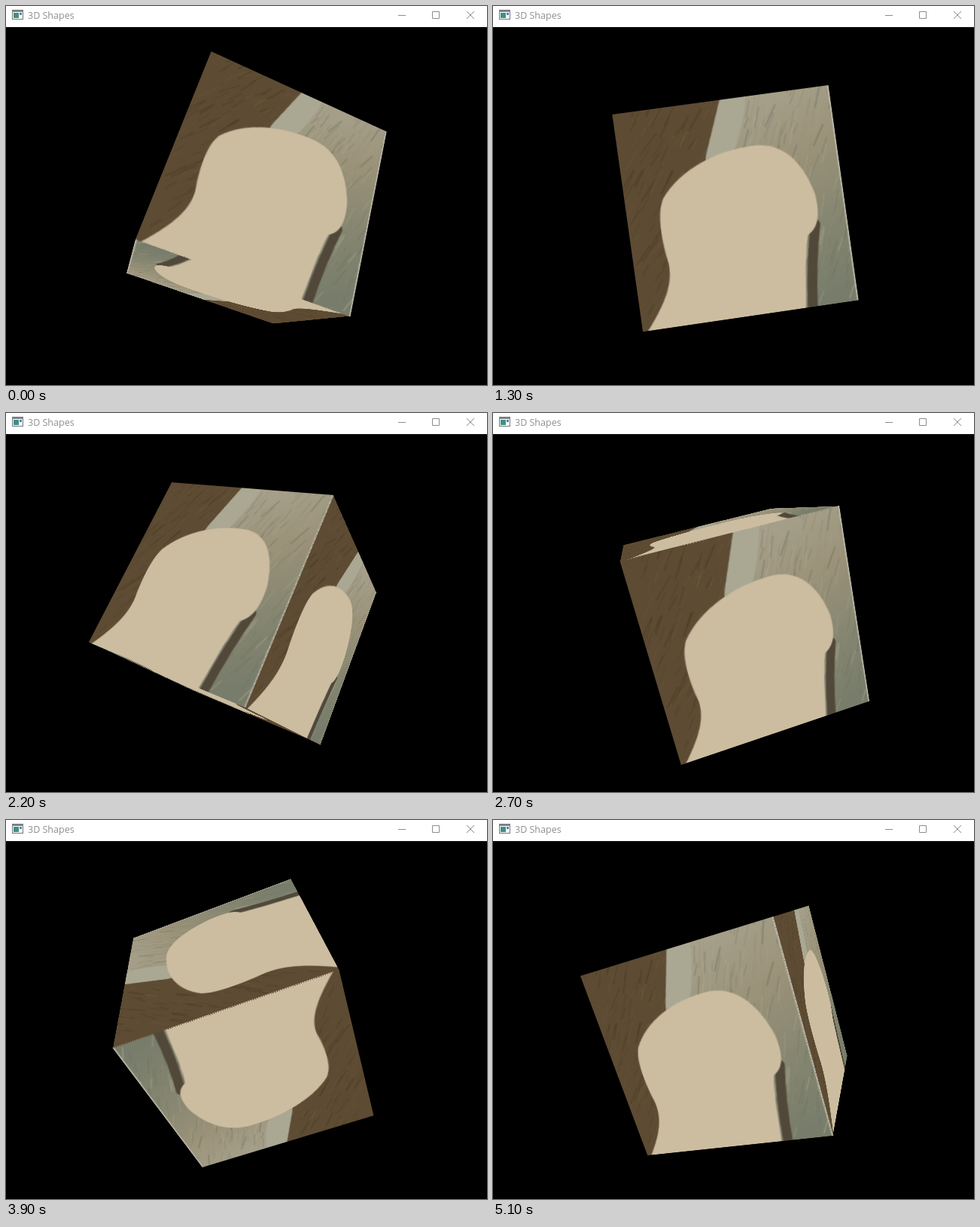
An HTML page with a canvas that plays this animation: 639x503 px, repeating every 5200 ms.

```html
<!DOCTYPE html>
<html lang="en">
<head>
<meta charset="utf-8">
<title>3D Shapes</title>
<style>
@property --a { syntax: '<angle>'; inherits: false; initial-value: 163.1deg; }
html, body { margin: 0; width: 100%; height: 100%; overflow: hidden; background: #000; }
.bar { position: absolute; left: 0; top: 0; width: 639px; height: 28px; background: #fff; }
.bar svg { display: block; }
.bar text { font: 12.5px "Open Sans", "Noto Sans", sans-serif; fill: #8f8f8f; }
.scene {
  position: absolute; left: 0; top: 0; width: 639px; height: 503px;
  perspective: 577px; perspective-origin: 320px 267.5px;
}
.cube {
  --half: 115.4px;
  position: absolute; left: 320px; top: 267.5px; width: 0; height: 0;
  transform-style: preserve-3d;
  transform: rotateX(calc(-1 * var(--a))) rotateY(var(--a)) rotateZ(calc(-1 * var(--a)));
  animation: spin 5200ms infinite;
}
/* Faces are a hair larger than the cube, so that no seam shows. */
.cube canvas {
  position: absolute; left: -115.9px; top: -115.9px; width: 231.8px; height: 231.8px;
  backface-visibility: hidden;
  transform: var(--turn) translateZ(var(--half));
}
/* Ten poses a second, with a slightly uneven speed. */
@keyframes spin {
  0%       { --a: 163.1deg; animation-timing-function: steps(7); }
  13.4615% { --a: 213.3deg; animation-timing-function: steps(6); }
  25%      { --a: 261.9deg; animation-timing-function: steps(9); }
  42.3076% { --a: 334.3deg; animation-timing-function: steps(10); }
  61.5384% { --a: 411.9deg; animation-timing-function: steps(7); }
  75%      { --a: 469.85deg; animation-timing-function: steps(12); }
  98.0769%, 100% { --a: 557.6deg; }
}
</style>
</head>
<body>
<div class="scene"><div class="cube"></div></div>
<div class="bar">
  <svg width="639" height="28">
    <rect x="8.5" y="5.5" width="14" height="12" fill="#fff" stroke="#6f7678"/>
    <path d="M8 6h15v2H8z" fill="#7f888a"/>
    <path d="M10 9h7v7h-7z" fill="#3f8f86"/>
    <path d="M18 9h3v3h-3z" fill="#5b7fae"/>
    <text x="29" y="17">3D Shapes</text>
    <g fill="none" stroke="#8c8c8c">
      <path d="M521 12.5h10M566.5 7.5h9v9h-9z"/>
      <path d="M612 7l10 10M622 7l-10 10"/>
    </g>
  </svg>
</div>
<script>
const SIZE = 288;
const turns = [
  'rotateY(0deg)', 'rotateY(180deg)', 'rotateY(90deg)', 'rotateY(-90deg)',
  'rotateX(90deg)', 'rotateX(-90deg) rotateZ(180deg)'
];
const leftWall = new Path2D('M0 0H142L115 68L90 150V288H0Z');
const rightWall = new Path2D('M142 0H288V288H90V150L115 68Z');
const figure = new Path2D(
  'M6 289C32 258 48 232 46 204C40 172 40 135 51 118C80 82 130 66 175 66' +
  'C215 64 240 95 250 140C254 172 246 186 233 193C224 225 222 260 217 289Z');

function random(seed) {
  return () => (seed = (seed * 16807) % 2147483647) / 2147483647;
}

function hatch(g, area, colors, count, angle, rnd) {
  g.save();
  g.clip(area);
  g.lineCap = 'round';
  for (let i = 0; i < count; i++) {
    const x = rnd() * SIZE, y = rnd() * SIZE;
    const len = 12 + rnd() * 24, dir = angle + (rnd() - 0.5) * 0.3;
    g.strokeStyle = colors[i % colors.length];
    g.globalAlpha = 0.25 + rnd() * 0.3;
    g.lineWidth = 0.8 + rnd() * 1.4;
    g.beginPath();
    g.moveTo(x, y);
    g.lineTo(x + len * Math.cos(dir), y + len * Math.sin(dir));
    g.stroke();
  }
  g.restore();
}

function paint(g) {
  const rnd = random(71);
  const wall = g.createLinearGradient(150, 0, 250, 288);
  wall.addColorStop(0, '#a8a38e');
  wall.addColorStop(0.35, '#9b9279');
  wall.addColorStop(0.7, '#838570');
  wall.addColorStop(1, '#777c6b');
  g.fillStyle = wall;
  g.fill(rightWall);
  g.fillStyle = '#5d4b33';
  g.fill(leftWall);
  hatch(g, leftWall, ['#483821', '#705a3d'], 420, -0.9, rnd);
  hatch(g, rightWall, ['#b0a78e', '#6f7261', '#938a70'], 420, -1.15, rnd);

  // Pale strip beside the corner of the wall.
  g.fillStyle = '#aaa793';
  g.fill(new Path2D('M142 0H177Q168 40 150 74H113L115 68Z'));

  // Dark shadow behind the figure.
  g.strokeStyle = '#51483a';
  g.lineCap = 'round';
  g.lineWidth = 13;
  g.stroke(new Path2D('M245 180Q232 230 226 292'));

  g.fillStyle = '#ccbda1';
  g.fill(figure);

  g.fillStyle = '#bdbaad';
  g.fillRect(SIZE - 2, 0, 2, SIZE);
}

const cube = document.querySelector('.cube');
for (const turn of turns) {
  const face = document.createElement('canvas');
  face.width = face.height = SIZE;
  face.style.setProperty('--turn', turn);
  paint(face.getContext('2d'));
  cube.append(face);
}
</script>
</body>
</html>
```
